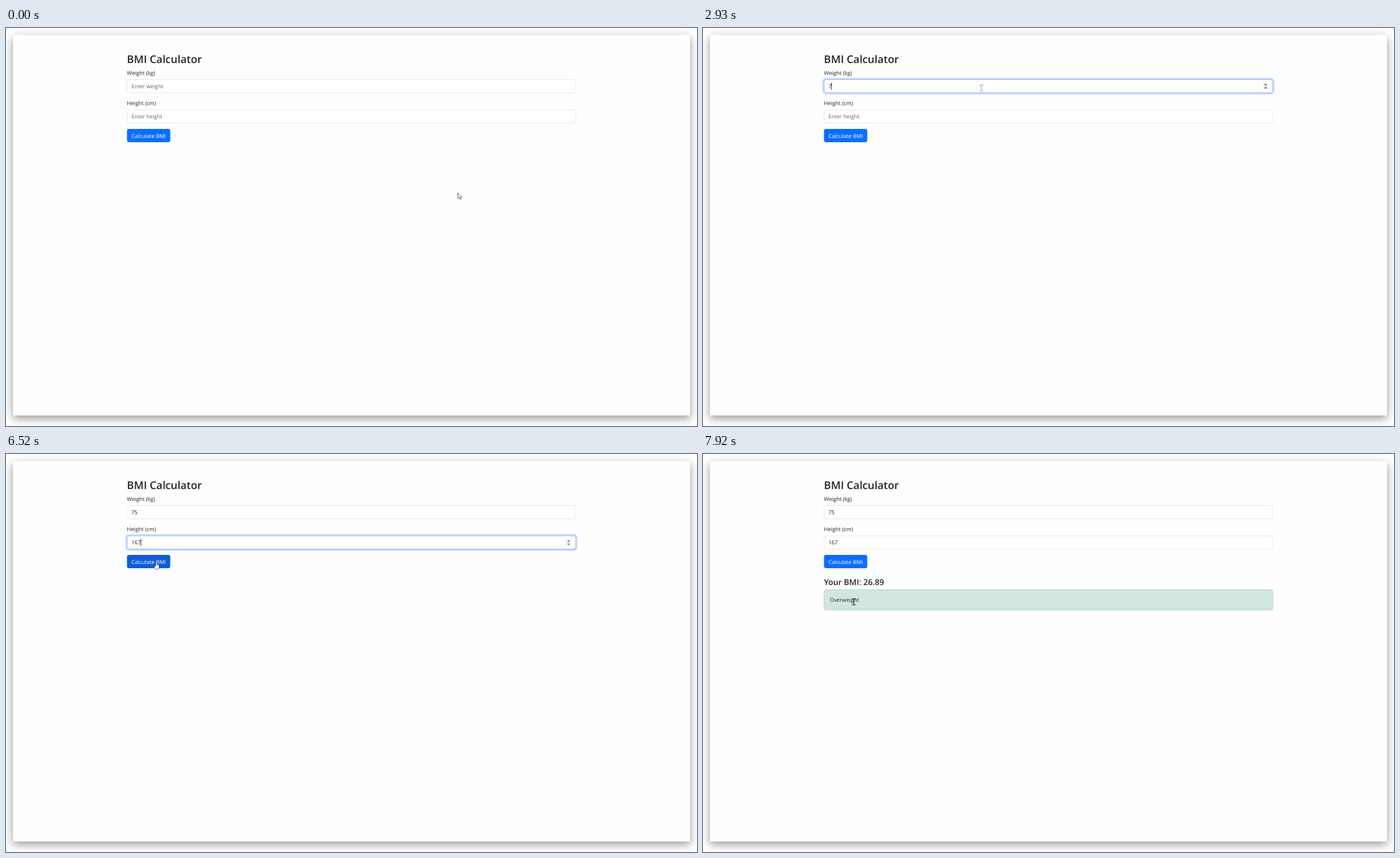
Write an HTML page that moves like this. It is 986 px wide and 568 px high and loops after 8000 ms.

```html
<!DOCTYPE html>
<html lang="en">
<head>
<meta charset="utf-8">
<title>BMI Calculator</title>
<style>
  html, body { margin: 0; width: 100%; height: 100%; overflow: hidden; background: #fff; }
  .panel {
    position: absolute; left: 10px; top: 10px; width: 966px; height: 543px;
    background: #fefefe; box-shadow: 0 4px 12px rgba(0, 0, 0, .42);
  }
  svg { position: absolute; left: 0; top: 0; display: block; }
  text {
    font: 7.78px "Open Sans", "Noto Sans", sans-serif;
    fill: #212529; text-rendering: geometricPrecision; white-space: pre;
  }
  .title { font-size: 15.15px; font-weight: 600; }
  .result { font-size: 11.5px; font-weight: 600; }
  .hint { fill: #63676a; }
  .box { fill: #fff; stroke: #dee2e6; stroke-width: .7; }
  .ring { fill: none; stroke: #0d6efd; stroke-opacity: .25; stroke-width: 2; }
  .edge { fill: none; stroke: #86b7fe; stroke-width: .7; }
  .caret { fill: #333; }
</style>
</head>
<body>
<div class="panel"></div>
<svg width="986" height="568" viewBox="0 0 986 568">
  <defs>
    <g id="field">
      <rect class="box" x="172.8" y=".35" width="640.2" height="18.9" rx="3"/>
    </g>
    <g id="focus">
      <rect class="ring" x="171.5" y="-1" width="642.8" height="21.6" rx="4"/>
      <rect class="edge" x="172.8" y=".35" width="640.2" height="18.9" rx="3"/>
    </g>
    <g id="spinner">
      <rect x="799" y="4.8" width="7.4" height="10" fill="#f1f1f1"/>
      <path d="M800.8 8.4L802.7 6.3L804.6 8.4ZM800.8 11.5L802.7 13.6L804.6 11.5Z"/>
    </g>
  </defs>

  <text class="title" x="172.5" y="49.8">BMI Calculator</text>
  <text x="172.6" y="66.6">Weight (kg)</text>
  <text x="172.6" y="109.8">Height (cm)</text>

  <g id="weight" transform="translate(0 73.2)"></g>
  <g id="height" transform="translate(0 116.5)"></g>

  <rect id="button" x="172.6" y="144" width="61.8" height="19" rx="3"/>
  <text x="178.9" y="156.5" style="fill:#fff">Calculate BMI</text>

  <g id="outcome">
    <text class="result" x="172.5" y="187">Your BMI: 26.89</text>
    <rect x="172.8" y="193.8" width="640.2" height="28.6" rx="3"
          fill="#d1e7dd" stroke="#a3cfbb" stroke-width=".7"/>
    <text x="180.9" y="211.4" style="fill:#26332e">Overweight</text>
  </g>

  <g id="arrow" fill="#fff" stroke="#555" stroke-width=".8" stroke-linejoin="round">
    <path d="M.3 .4V8.6L2.2 6.9L3.5 9.6L4.7 9L3.5 6.4H6.1Z"/>
  </g>
  <g id="beam" fill="none" stroke-width="1">
    <path d="M-2.8 -4.3H-.8L0 -3.8L.8 -4.3H2.8M0 -3.8V3.8M-2.8 4.3H-.8L0 3.8L.8 4.3H2.8"/>
  </g>
  <g id="hand" fill="#fff" stroke="#333" stroke-width=".6" stroke-linejoin="round">
    <path d="M-.8 .4Q0 -.8 .8 .4V4L2.2 4.2L3.6 4.7Q4.4 5 4.2 6.2L3.4 10.4H-1L-3.2 7Q-3.6 5.8 -2.4 5.8L-.8 7Z"/>
  </g>
</svg>

<script>
const LOOP = 8000;
const $ = id => document.getElementById(id);
const show = (el, on) => el.setAttribute('visibility', on ? 'visible' : 'hidden');

// Each track is a list of [start ms, value...] and holds until the next row.
const at = (track, t) => track.filter(row => row[0] <= t).pop();

const cursor = [
  [0, 'arrow', 644.5, 235],
  [160, 'arrow', 636, 230], [260, 'arrow', 600, 208], [360, 'arrow', 540, 172],
  [450, 'arrow', 478, 138], [550, 'arrow', 428, 104], [650, 'beam', 402, 88.5],
  [750, 'beam', 397.2, 85.8],
  [6020, 'beam', 391, 88], [6120, 'arrow', 358, 106], [6220, 'beam', 300, 126],
  [6320, 'arrow', 248, 145], [6420, 'hand', 222, 152], [6520, 'hand', 214.4, 154],
  [6920, 'arrow', 333, 184], [7020, 'arrow', 328, 188], [7120, 'arrow', 314, 194],
  [7220, 'arrow', 292, 199], [7320, 'arrow', 266, 203], [7420, 'arrow', 243, 205],
  [7520, 'arrow', 226, 205], [7620, 'beam', 212, 210.5], [7710, 'beam', 203, 211],
  [7810, 'beam', 219, 211], [7920, 'beam', 215.2, 211]
];
const caret = [
  [0, 0], [1150, 1], [1710, 0], [2250, 1], [2750, 0], [2930, 1],
  [4450, 0], [4880, 1], [5580, 0], [6120, 1], [6620, 0]
];
const button = [
  [0, '#0d6efd'], [6420, '#0c66ea'], [6520, '#0b5ed7'],
  [6620, '#0a58ca'], [6820, '#0b5ed7'], [6920, '#0d6efd']
];
const fields = [
  {
    id: 'weight', hint: 'Enter weight', arrows: '#333',
    text: [[0, ''], [2930, '7'], [3120, '75']],
    focus: [[0, 0], [1150, .5], [1250, 1], [3380, .5], [3470, 0]],
    spinner: [[0, 0], [650, 1], [6120, 0]],
    active: [1150, 3380]
  },
  {
    id: 'height', hint: 'Enter height', arrows: '#666',
    text: [[0, ''], [3920, '1'], [4880, '16'], [4980, '167']],
    focus: [[0, 0], [3380, .5], [3470, 1], [6620, .5], [6720, 0]],
    spinner: [[0, 0], [3380, 1], [6620, 0]],
    active: [3380, 6620]
  }
];

for (const f of fields) {
  const g = $(f.id);
  g.innerHTML = `<use href="#field"/><use href="#focus"/>
    <use href="#spinner" fill="${f.arrows}"/>
    <text x="178.9" y="12.8"></text>
    <rect class="caret" y="4.8" width=".9" height="10"/>`;
  [, f.ring, f.spin, f.label, f.bar] = g.children;
}

function drawField(f, t) {
  const typed = at(f.text, t)[1];
  f.label.textContent = typed || f.hint;
  f.label.setAttribute('class', typed ? '' : 'hint');
  f.ring.setAttribute('opacity', at(f.focus, t)[1]);
  show(f.spin, at(f.spinner, t)[1]);
  const active = t >= f.active[0] && t < f.active[1];
  show(f.bar, active && at(caret, t)[1]);
  f.bar.setAttribute('x', Math.floor(179 + 4.4 * typed.length));
}

function drawCursor(t) {
  const [, kind, x, y] = at(cursor, t);
  for (const id of ['arrow', 'beam', 'hand']) show($(id), id === kind);
  $(kind).setAttribute('transform', `translate(${x} ${y})`);
  $('beam').setAttribute('stroke', t < 6900 ? '#8fb0d6' : '#222');
}

function draw(t) {
  for (const f of fields) drawField(f, t);
  $('button').setAttribute('fill', at(button, t)[1]);
  show($('outcome'), t >= 6820);
  drawCursor(t);
}

const start = performance.now();
function tick() {
  draw((performance.now() - start) % LOOP);
  requestAnimationFrame(tick);
}
tick();
</script>
</body>
</html>
```
